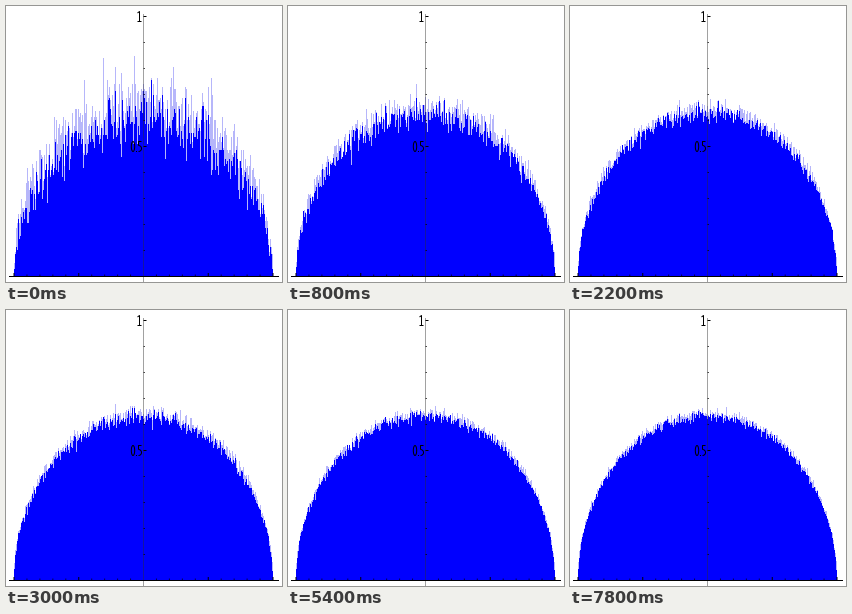
Animation of 276x276 px, one loop 8000 ms. Source, as a matplotlib script:

```python
import numpy as np
import matplotlib.pyplot as plt
from matplotlib.animation import FuncAnimation

SIZE, DPI = 276, 100
FRAMES, INTERVAL = 40, 200
LEFT, RIGHT, BASE = 8, 267, 270   # bounds of the histogram, in pixels
CX, UNIT = 137.5, 260             # vertical axis, height of 1.0
PER_UNIT = 118                    # expected count in a bin of density 1
BLUE, PALE = "#0000ff", "#b6b6fa"

# Sampled semicircle law, two bins per pixel column; counts add up over time
cols = RIGHT - LEFT
edges = np.linspace(-1, 1, 2 * cols + 1)
mid = (edges[:-1] + edges[1:]) / 2
density = 2 / np.pi * np.sqrt(1 - mid ** 2)
rng = np.random.default_rng(12)
counts = rng.poisson(density * PER_UNIT, (FRAMES, 2 * cols)).cumsum(axis=0)
trials = np.arange(1, FRAMES + 1)[:, None]
tops = np.round(BASE - UNIT * counts / (PER_UNIT * trials))
tops = tops.reshape(FRAMES, cols, 2)
high, low = tops.min(axis=2), tops.max(axis=2)

fig = plt.figure(figsize=(SIZE / DPI, SIZE / DPI), dpi=DPI, facecolor="white")
ax = fig.add_axes([0, 0, 1, 1])
ax.set(xlim=(0, SIZE), ylim=(SIZE, 0))
ax.axis("off")


def line(xs, ys, **style):
    style = {"color": "black", "lw": 72 / DPI, "snap": False, "zorder": 3,
             "solid_capstyle": "butt", **style}
    ax.plot(xs, ys, **style)


def arc(x, y, rx, ry, start, end):
    a = np.radians(np.linspace(start, end, 24))
    return x + rx * np.cos(a), y + ry * np.sin(a)


def bars(values, color, zorder):
    return ax.stairs(values, np.arange(LEFT, RIGHT + 1), baseline=BASE,
                     fill=True, color=color, lw=0, snap=False, zorder=zorder)


pale = bars(high[0], PALE, 0)
solid = bars(low[0], BLUE, 1)

# Axes with ticks every 0.1, longer at every fifth
line([CX, CX], [8, SIZE], color="#303030", alpha=0.45)
line([3, 273], [BASE + 0.5] * 2)
for i in range(1, 11):
    size, alpha = (3, 1) if i % 5 == 0 else (1.5, 0.7)
    y = BASE + 0.5 - UNIT * i / 10
    line([CX, CX + size], [y, y], alpha=alpha)
    for side in (-1, 1):
        x = CX + side * i * cols / 20
        line([x, x], [BASE, BASE - size], alpha=alpha)

# Labels "1" and "0.5" in thin narrow strokes
line([131.5, 133.5, 133.5], [7, 5.5, 15.5])
line([131.5, 135.5], [15.5, 15.5])
line(*arc(127, 140.5, 1.7, 5, 0, 360))
line([130, 131], [145.5, 145.5])
line([135.5, 132.5, 132.5], [135.5, 135.5, 139.5])
line(*arc(132.5, 142.5, 3, 3, -90, 90))


def draw(k):
    pale.set_data(values=high[k])
    solid.set_data(values=low[k])
    return pale, solid


anim = FuncAnimation(fig, draw, frames=FRAMES, interval=INTERVAL,
                     repeat=True, repeat_delay=0)
plt.show()
```
